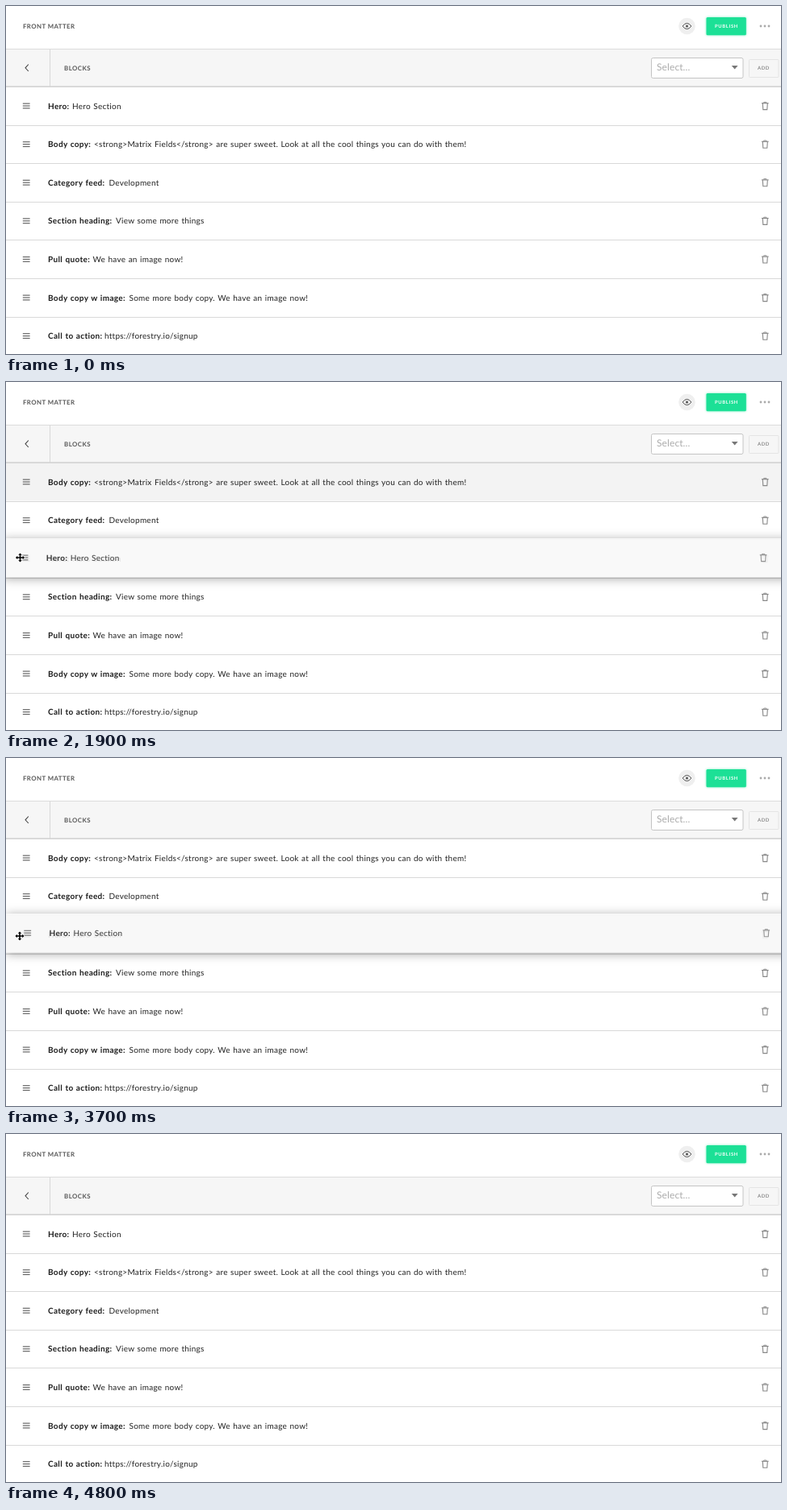
Write an HTML page with a canvas that moves like this. It is 960 px wide and 432 px high and loops after 6800 ms.

```html
<!DOCTYPE html>
<html lang="en">
<head>
<meta charset="utf-8">
<title>Reordering blocks</title>
<style>
html, body { margin: 0; width: 100%; height: 100%; overflow: hidden; background: #fff; }
canvas { display: block; width: 960px; height: 432px; }
</style>
</head>
<body>
<canvas id="stage"></canvas>
<script>
const W = 960, H = 432, LOOP = 6800, STEP = 100;
const FIRST = 124, PITCH = 47.6;
const canvas = document.getElementById('stage');
const ratio = window.devicePixelRatio || 1;
canvas.width = W * ratio;
canvas.height = H * ratio;
const ctx = canvas.getContext('2d');

const hero = { label: 'Hero:', text: 'Hero Section', x: 82 };
const others = [
  { label: 'Body copy:', text: '<strong>Matrix Fields</strong> are super sweet. Look at all the cool things you can do with them!', x: 109 },
  { label: 'Category feed:', text: 'Development', x: 127.5 },
  { label: 'Section heading:', text: 'View some more things', x: 136 },
  { label: 'Pull quote:', text: 'We have an image now!', x: 107.5 },
  { label: 'Body copy w image:', text: 'Some more body copy. We have an image now!', x: 152.5 },
  { label: 'Call to action:', text: 'https://forestry.io/signup', x: 122 }
];

// Pointer visits: start time and one position per step; the last one holds until the end.
const moves = [
  { from: 1100, to: 1600, slot: 0, hover: 0, path: [[3, 119.5], [12, 121], [18, 123.5], [21, 124.5]] },
  { from: 1600, to: 2400, slot: 0, hover: 0, grab: [19.7, 124],
    path: [[20.5, 128], [20, 157], [19, 192], [17.5, 218], [17, 228], [16, 232], [15.7, 234]] },
  { from: 2400, to: 2700, slot: 2, hover: 2, path: [[14, 234], [10, 234], [4, 233]] },
  { from: 2700, to: 3200, slot: 2 },
  { from: 3200, to: 3700, slot: 2, hover: 2, path: [[5, 232], [11, 234], [15, 231], [17, 229]] },
  { from: 3700, to: 4400, slot: 2, hover: 2, grab: [15.5, 223],
    path: [[17, 221], [20, 190], [21.5, 158], [22, 132], [22, 118], [21.5, 114]] },
  { from: 4400, to: 4800, slot: 0, hover: 0, path: [[19, 114], [14, 115], [9, 116], [4, 117]] }
];

const slotY = i => FIRST + PITCH * i;

function text(str, x, y, size, color, weight = 400, spacing = 0, words = 0) {
  ctx.font = `${weight} ${size}px Lato, sans-serif`;
  ctx.letterSpacing = spacing + 'px';
  ctx.wordSpacing = words + 'px';
  ctx.textRendering = 'geometricPrecision';
  ctx.fillStyle = color;
  ctx.fillText(str, x, y);
}

function rect(x, y, w, h, color) {
  ctx.fillStyle = color;
  ctx.fillRect(x, y, w, h);
}

function box(x, y, w, h, fill, stroke, r = 2) {
  ctx.beginPath();
  ctx.roundRect(x, y, w, h, r);
  ctx.fillStyle = fill;
  ctx.fill();
  if (!stroke) return;
  ctx.strokeStyle = stroke;
  ctx.lineWidth = 1;
  ctx.stroke();
}

function dot(x, y, r, color) {
  ctx.beginPath();
  ctx.arc(x, y, r, 0, Math.PI * 2);
  ctx.fillStyle = color;
  ctx.fill();
}

function line(points, color, width) {
  ctx.beginPath();
  points.forEach(([x, y]) => ctx.lineTo(x, y));
  ctx.strokeStyle = color;
  ctx.lineWidth = width;
  ctx.stroke();
}

function eye(x, y) {
  dot(x, y, 10.3, '#efefef');
  ctx.beginPath();
  ctx.moveTo(x - 5.4, y);
  ctx.quadraticCurveTo(x, y - 7.2, x + 5.4, y);
  ctx.quadraticCurveTo(x, y + 7.2, x - 5.4, y);
  ctx.strokeStyle = '#505050';
  ctx.lineWidth = 1;
  ctx.stroke();
  dot(x, y, 1.5, '#505050');
}

function header() {
  text('FRONT MATTER', 21, 27.9, 7.8, '#555', 700, 0.45);
  eye(843.5, 25);
  ctx.save();
  ctx.shadowColor = 'rgba(28, 224, 150, .6)';
  ctx.shadowBlur = 3 * ratio;
  box(867.5, 14, 49.3, 22.3, '#1ce096', null, 1.5);
  ctx.restore();
  text('PUBLISH', 878, 27.2, 5.8, '#fff', 700, 0.7);
  [935, 940, 945].forEach(x => dot(x, 25, 1.4, '#aaa'));

  rect(0, 53, W, 47, '#f6f6f6');
  rect(0, 53, W, 1, '#dcdcdc');
  rect(54, 54, 1, 46, '#d8d8d8');
  line([[27.8, 72.5], [24, 76.8], [27.8, 81]], '#444', 1.1);
  text('BLOCKS', 72, 79.5, 7.8, '#555', 700, 0.5);
  box(799.5, 64.5, 113.5, 25, '#fff', '#c4c4c4');
  text('Select...', 806, 80.2, 12, '#acacac', 400, 0.1);
  ctx.beginPath();
  ctx.moveTo(898.8, 74);
  ctx.lineTo(906.6, 74);
  ctx.lineTo(902.7, 78.4);
  ctx.fillStyle = '#777';
  ctx.fill();
  box(920.5, 66.5, 36.5, 22, '#f6f6f6', '#e4e4e4', 1);
  text('ADD', 931, 79.4, 6, '#8c8c8c', 700, 0.5);
}

function trash(x, y) {
  line([[x - 4.3, y - 3.3], [x + 4.3, y - 3.3]], '#888', 1.2);
  line([[x - 1.6, y - 3.6], [x - 1.6, y - 4.6], [x + 1.6, y - 4.6], [x + 1.6, y - 3.6]], '#888', 0.9);
  line([[x - 3, y - 3], [x - 2.5, y + 4.6], [x + 2.5, y + 4.6], [x + 3, y - 3]], '#888', 1.1);
}

function content(row, y) {
  [-2.9, 0, 2.9].forEach(d => rect(20.8, y + d - 0.6, 8.8, 1.2, '#666'));
  text(row.label, 52, y + 3.5, 10, '#1c1c1c', 700, 0.34, 0.6);
  text(row.text, row.x, y + 3.5, 10, '#222', 400, 0.25, 0.6);
  trash(940.3, y);
}

function list(slot, hover) {
  const rows = others.slice();
  rows.splice(slot, 0, hero);
  rows.forEach((row, i) => {
    const y = slotY(i);
    if (i === hover) rect(0, y - 23.5, W, 47, '#f3f3f3');
    content(row, y);
    if (i < rows.length - 1) rect(0, Math.round(y + 23.6), W, 1, '#d9d9d9');
  });
  rect(0, 99.3, W, 1.6, '#d2d2d2');
}

function dragged(dx, dy, y) {
  ctx.save();
  ctx.translate(dx, dy);
  const left = -2, top = y - 23.8, w = W + 24, h = 48;

  // The shadow stays outside the translucent row.
  ctx.save();
  ctx.beginPath();
  ctx.rect(-100, -500, W + 200, 1500);
  ctx.rect(left, top, w, h);
  ctx.clip('evenodd');
  ctx.shadowColor = 'rgba(0, 0, 0, .36)';
  ctx.shadowBlur = 12 * ratio;
  ctx.shadowOffsetY = 2 * ratio;
  rect(left, top, w, h, '#f9f9f9');
  ctx.restore();

  ctx.globalAlpha = 0.9;
  rect(left, top, w, h, '#f9f9f9');
  content(hero, y);
  ctx.restore();
}

function pointer(x, y) {
  ctx.save();
  ctx.translate(x, y);
  ctx.beginPath();
  for (let i = 0; i < 4; i++) {
    [[0.8, -0.8], [0.8, -3.2], [2.3, -3.2], [0, -5.6], [-2.3, -3.2], [-0.8, -3.2], [-0.8, -0.8]]
      .forEach(([px, py]) => {
        const a = -i * Math.PI / 2, c = Math.cos(a), s = Math.sin(a);
        ctx.lineTo(px * c - py * s, px * s + py * c);
      });
  }
  ctx.closePath();
  ctx.lineJoin = 'round';
  ctx.strokeStyle = '#fff';
  ctx.lineWidth = 1.2;
  ctx.stroke();
  ctx.fillStyle = '#000';
  ctx.fill();
  ctx.restore();
}

function draw(time) {
  const move = moves.find(m => time >= m.from && time < m.to) || { slot: 0 };
  const { path, grab, hover } = move;
  const step = path && Math.min(path.length - 1, Math.floor((time - move.from) / STEP));
  const at = path && path[step];
  let slot = move.slot, dx, dy;
  if (grab) {
    dx = at[0] - grab[0];
    dy = at[1] - grab[1];
    slot = Math.max(0, Math.round(slot + dy / PITCH));
  }

  ctx.setTransform(ratio, 0, 0, ratio, 0, 0);
  rect(0, 0, W, H, '#fff');
  header();
  list(slot, hover);
  if (grab) dragged(dx, dy, slotY(move.slot));
  if (at) pointer(at[0], at[1]);
}

const start = performance.now();
function tick() {
  draw((performance.now() - start) % LOOP);
  requestAnimationFrame(tick);
}
tick();
</script>
</body>
</html>
```
